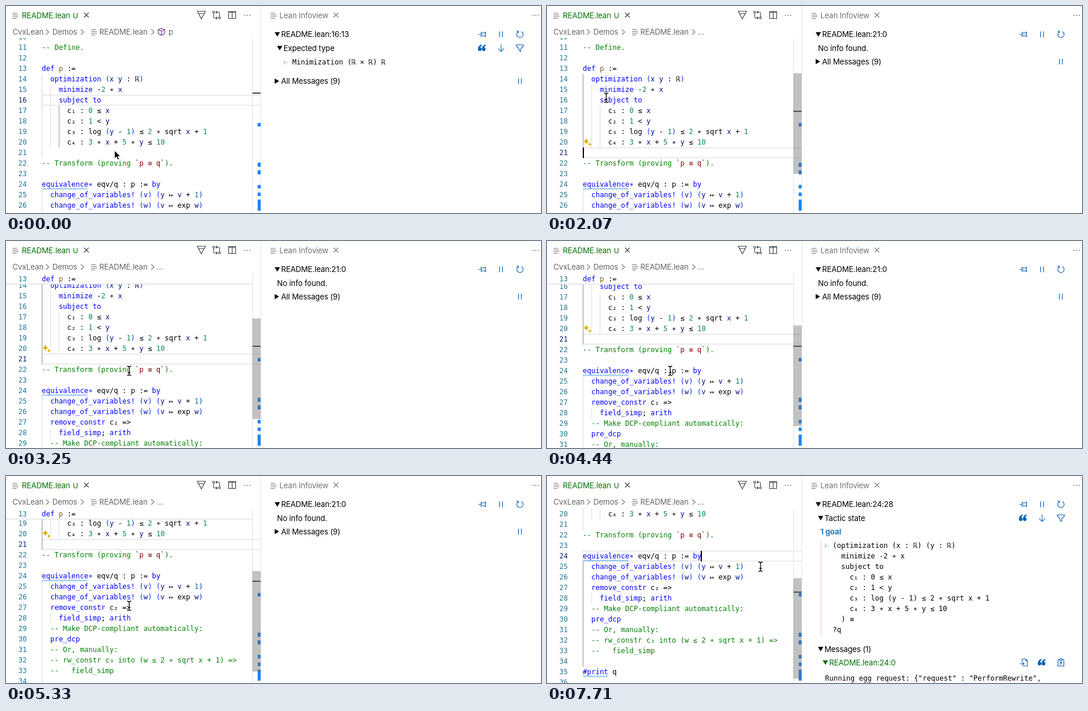
These frames come from a looping animation (912 px wide and 354 px high, 8 s). An HTML page:

```html
<!DOCTYPE html>
<html lang="en">
<head>
<meta charset="utf-8">
<title>Lean editor and infoview</title>
<style>
html, body { margin: 0; width: 100%; height: 100%; overflow: hidden; background: #fff; }
svg { display: block; width: 912px; height: 354px; }
text { white-space: pre; }
.mono { font: 12px "DejaVu Sans Mono", monospace; fill: #000; }
.ui { font: 13px Inter, sans-serif; letter-spacing: -.13px; fill: #000; }
.comment { fill: #008000; }
.keyword { fill: #0000ff; }
.name { fill: #795e26; }
.number { fill: #098658; }
.bracket { fill: #0431fa; }
.variable { fill: #001080; }
.quoted { fill: #800000; }
.lineno { fill: #237893; }
.lineno.active { fill: #0b216f; }
.guide { stroke: #d9d9d9; }
.guide.active { stroke: #939393; }
.icon { fill: none; stroke: #005fb8; stroke-width: 1.1; }
.solid { fill: #005fb8; }
.dark { stroke: #3b3b3b; }
.grey { stroke: #777; }
</style>
</head>
<body>
<svg id="stage" viewBox="0 0 912 354"></svg>
<script>
const LOOP = 8000, ROW = 18, CHAR = 7.224, LEFT = 61, FIRST = 10;

const CODE = `

-- Define.

def p :=
  optimization (x y : ℝ)
    minimize -2 * x
    subject to
      c₁ : 0 ≤ x
      c₂ : 1 < y
      c₃ : log (y - 1) ≤ 2 * sqrt x + 1
      c₄ : 3 * x + 5 * y ≤ 10

-- Transform (proving \`p ≡ q\`).

equivalence* eqv/q : p := by
  change_of_variables! (v) (y ↦ v + 1)
  change_of_variables! (w) (v ↦ exp w)
  remove_constr c₂ =>
    field_simp; arith
  -- Make DCP-compliant automatically:
  pre_dcp
  -- Or, manually:
  -- rw_constr c₃ into (w ≤ 2 * sqrt x + 1) =>
  --   field_simp

#print q
`.split('\n').slice(1);

// time, scroll, pointer x, pointer y
const STEPS = [
  [0, 0, 185, 247], [740, 0, 189, 252], [890, 0, 187, 250], [1040, 0, 180, 243],
  [1180, 0, 166, 229], [1330, 0, 148, 208], [1480, 0, 128, 185], [1630, 0, 112, 168],
  [1780, 0, 104, 160], [1920, 0, 101, 157], [2220, 0, 122, 170], [2360, 0, 172, 202],
  [2520, 0, 204, 219], [2660, 15, 210, 222], [2810, 32, 210, 222], [3110, 49, 210, 222],
  [3250, 49, 210, 222], [3550, 66, 210, 222], [3690, 66, 210, 222], [4140, 66, 210, 222],
  [4440, 83, 210, 222], [4590, 100, 210, 222], [4740, 100, 210, 222], [4890, 117, 210, 222],
  [5190, 117, 210, 222], [5330, 134, 210, 222], [5630, 151, 210, 222], [5930, 168, 210, 222],
  [6230, 168, 228, 208], [6380, 168, 270, 172], [6530, 168, 306, 146], [6670, 168, 318, 139],
  [6820, 168, 322, 139], [6970, 168, 338, 144], [7120, 168, 356, 152], [7260, 168, 364, 155],
  [7710, 168, 364, 155]
];

const CLASSES = ['comment', 'keyword', 'name', 'number', 'bracket', 'variable'];
const TOKENS = /(--.*)|(def|optimization|minimize|subject to|equivalence\*|change_of_variables!|remove_constr|field_simp|arith|pre_dcp|#print|\bby\b)|((?<=def )p)|(\b\d+\b)|([()])|(\b[xyvw]\b)/g;

const glyphs = s => s.replace(/</g, '&lt;').replace(/\*/g, '∗');
const span = (cls, s) => `<tspan class="${cls}">${s}</tspan>`;
const highlight = s => glyphs(s.replace(/</g, '‹').replace(TOKENS, (m, ...groups) => {
  const cls = CLASSES[groups.findIndex(Boolean)];
  return `\u0001${cls}\u0002${m.replace(/`.*`/, q => `\u0003\u0001quoted\u0002${q}\u0003\u0001comment\u0002`)}\u0003`;
})).replace(/‹/g, '&lt;')
  .replace(/\u0001(\w+)\u0002([^\u0003]*)\u0003/g, (_, cls, s) => span(cls, s));

const ui = (x, y, s, attrs = '') => `<text class="ui" x="${x}" y="${y}" ${attrs}>${s}</text>`;
const mono = (x, y, s, cls = '') => `<text class="mono ${cls}" x="${x}" y="${y}">${s}</text>`;
const rect = (x, y, w, h, fill, attrs = '') =>
  `<rect x="${x}" y="${y}" width="${w}" height="${h}" fill="${fill}" ${attrs}/>`;
const icon = (x, y, d, cls = '') => `<path class="icon ${cls}" transform="translate(${x} ${y})" d="${d}"/>`;
const group = (id, body, attrs = '') => `<g id="${id}" ${attrs}>${body}</g>`;
const rowTop = n => 62 + (n - 11) * ROW;

const ICON = {
  lines: 'M-5-3.5H3M-5-.5H5M-5 2.5H5M-5 5.5H2',
  close: 'M-4-4L4 4M4-4L-4 4',
  chevron: 'M-2.5-4.5L2.5 0L-2.5 4.5',
  dots: 'M-5.5 0h2M-1 0h2M3.5 0h2',
  forall: 'M-7-6.5H7L0 6.5ZM-4.5-2.5H4.5',
  compare: 'M-5-6.5a1.6 1.6 0 1 1-.1 0M-5-3V3.5Q-5 5-3 5H1M-1 2.8L1.3 5L-1 7.2M5 3.3a1.6 1.6 0 1 1-.1 0M5 3V-3.5Q5-5 3-5H-1M1-7.2L-1.3-5L1-2.8',
  split: 'M-6-6H6V6H-6ZM0-6V6M-6-4.5H6',
  cube: 'M0-6L5.5-3.5V3L0 6L-5.5 3V-3.5ZM-5.5-3.5L0-1L5.5-3.5M0-1V6',
  pin: 'M-6.5 0H-2M-2-4.5V4.5M-2-2.5H3.5L5.5-4V4L3.5 2.5H-2',
  pause: 'M-2.5-5V5M2.5-5V5',
  refresh: 'M-3-4.4A5.4 5.4 0 1 0 2.5-4.8M-6-5.5H-2.5V-2',
  down: 'M0-6V5.5M-5 .8L0 5.8L5 .8',
  filter: 'M-6-5.5H6V-3.8L1.5 1V5.5L-1.5 4V1L-6-3.8Z',
  quote: 'M-1-5.5Q-6-3-6 2A2.6 2.6 0 1 0-3-.8Q-3.3-3-.6-4.6ZM5.8-5.5Q.8-3 .8 2A2.6 2.6 0 1 0 3.8-.8Q3.5-3 6.2-4.6Z',
  goto: 'M-3-1V-6H3L6-3V6H-2M3-6V-3H6M-7 2H0M-2.5-.7L.2 2L-2.5 4.7',
  paste: 'M-2-5H-5V6H5V-5H2M-2-6.5H2V-3.5H-2ZM0 4V-1M-2.3 1.2L0-1.2L2.3 1.2'
};

const tri = (x, y, open = true, fill = '#000') =>
  `<path fill="${fill}" d="${open ? `M${x} ${y - 3.7}h9l-4.5 7.6z` : `M${x} ${y - 4.5}v9l7.5-4.5z`}"/>`;
const quoteIcon = (x, y) => icon(x, y, ICON.quote, 'solid');
const pause = y => icon(876, y, ICON.pause, 'pausing');
const panelHead = place => tri(458, 48.5) + ui(469, 53, 'README.lean:' + place) +
  icon(812, 48.5, ICON.pin) + icon(844, 48.5, ICON.pause) + icon(876, 48.5, ICON.refresh);
const goalTools = quoteIcon(811, 72) + icon(844, 72, ICON.down) + icon(876, 72, ICON.filter);
const allMessages = y => tri(458, y, false) + ui(469, y + 4.5, 'All Messages (9)') + pause(y);
const turnstile = y => mono(473, y, '⊢', '" fill-opacity=".55" style="fill:#2a6f9f');

const GOAL = `(optimization (x : ℝ) (y : ℝ)
  minimize -2 * x
  subject to
    c₁ : 0 ≤ x
    c₂ : 1 < y
    c₃ : log (y - 1) ≤ 2 * sqrt x + 1
    c₄ : 3 * x + 5 * y ≤ 10
  ) ≡
?q`.split('\n');

function wave(x, y, width) {
  let d = `M${x} ${y}`;
  for (let i = 1; i * 2.5 <= width; i++) d += `L${x + i * 2.5} ${y + (i % 2 ? 2.2 : 0)}`;
  return `<path d="${d}" fill="none" stroke="#1a85ff"/>`;
}

const guide = (level, from, to, owner) => {
  const x = LEFT + level * 2 * CHAR + .5;
  return `<path class="guide" data-owner="${owner}" d="M${x} ${rowTop(from)}V${rowTop(to + 1)}"/>`;
};

function codeLine(s, i) {
  const n = FIRST + i, y = rowTop(n) + 13, indent = s.search(/\S/);
  return mono(21, y, n, `lineno" data-line="${n}`) +
    (indent < 0 ? '' : mono(LEFT + indent * CHAR, y, highlight(s.trim())));
}

const header =
  icon(16, 16, ICON.lines, 'grey') + ui(27, 20.5, 'README.lean', 'style="fill:#007100"') +
  ui(114, 20.5, 'U', 'style="fill:#007100;font-size:12px"') + icon(137, 15.5, ICON.close, 'dark') +
  icon(333, 15.5, ICON.forall, 'dark') + icon(359, 15.5, ICON.compare, 'dark') +
  icon(385.5, 15.5, ICON.split, 'dark') + icon(411, 16, ICON.dots, 'dark" stroke-width="2') +
  icon(456, 16, ICON.lines, 'grey') + ui(466, 20.5, 'Lean Infoview', 'style="fill:#717171"') +
  icon(562.5, 15.5, ICON.close, 'grey') + icon(903, 16, ICON.dots, 'dark');

const crumb = (x, s) => ui(x, 49, s, 'style="fill:#666"');
const crumbs =
  crumb(11, 'CvxLean') + crumb(79, 'Demos') + crumb(159, 'README.lean') +
  [70.5, 130, 250].map(x => icon(x, 44.5, ICON.chevron, 'grey')).join('') +
  icon(150, 44, ICON.lines, 'grey') +
  group('crumbName', `<g style="--c:#652d90">${icon(265, 44, ICON.cube, '" style="stroke:#652d90')}</g>` + crumb(277, 'p')) +
  group('crumbMore', crumb(257, '...'));

const sparkle = group('sparkle',
  '<path fill="#ddb100" d="M67 226q1 4.500 5 5.500q-4 1-5 5.500q-1-4.500-5-5.500q4-1 5-5.500zM73 233.500q.6 2.600 3.200 3.200q-2.600.6-3.200 3.200q-.6-2.600-3.200-3.200q2.600-.6 3.200-3.200z"/>');

const editor = group('scroller',
  `<rect id="current" x="61.5" width="380" height="17" fill="none" stroke="#e4e4e4" stroke-width="1.5"/>` +
  guide(0, 14, 21, 21) + guide(1, 15, 20, 0) + guide(2, 17, 20, 16) +
  guide(0, 25, 34, 24) + guide(1, 28, 28, 0) +
  CODE.map(codeLine).join('') +
  wave(LEFT, rowTop(24) + 15.5, 11 * CHAR) + wave(LEFT, rowTop(35) + 15.5, 6 * CHAR) +
  sparkle + '<rect id="caret" width="2" height="18"/>');

const sticky = group('sticky',
  rect(0, 55, 420, 18, '#fff') + rect(0, 73, 420, 1.2, '#ddd') +
  mono(21, 68.500, 13, 'lineno') + mono(LEFT, 68.500, highlight('def p :=')));

const ruler = rect(420, 56, 1, 298, '#e2e2e2') +
  [[200, 6], [268, 7], [281, 7], [306, 6], [319, 6], [331, 19]]
    .map(([y, h]) => rect(429, y, 5, h, '#1a85ff')).join('') +
  rect(420, 0, 14, 2, '#424242', 'id="position"') +
  rect(420, 115, 14, 172, '#646464', 'id="slider" fill-opacity=".4"');

const panels =
  group('panel0', panelHead('16:13') + tri(462, 72) + ui(473, 76.5, 'Expected type') + goalTools +
    turnstile(100) + mono(488, 100, 'Minimization (ℝ × ℝ) ℝ') + allMessages(128.5)) +
  group('panel1', panelHead('21:0') + ui(462, 76.5, 'No info found.') + allMessages(95)) +
  group('panel2', panelHead('24:28') + tri(462, 72) + ui(473, 76.5, 'Tactic state') + goalTools +
    ui(466, 99.5, '1 goal', 'style="fill:#2a78b8;font-weight:700"') +
    rect(466.5, 110, 1, 162, '#ffbcbc') + turnstile(123) +
    GOAL.map((s, i) => mono(487 + s.search(/\S/) * CHAR, 123 + i * ROW, glyphs(s.trim()))).join('')) +
  group('messages', tri(462, 296) + ui(473, 300.5, 'Messages (1)') +
    tri(470, 319, true, '#007100') + ui(481, 323.5, 'README.lean:24:0', 'style="fill:#007100"') +
    icon(813, 319, ICON.goto) + quoteIcon(843, 319) + icon(876, 319, ICON.paste) +
    mono(474, 350, 'Running egg request: {"request" : "PerformRewrite",'));

const pointers =
  group('arrow', '<path d="M0 0V14L3.300 11L5.500 16L8 15L5.800 10.200H10Z" stroke="#fff"/>') +
  group('beam', ['#fff" stroke-width="3', '#000" stroke-width="1.3'].map(stroke =>
    `<path fill="none" stroke="${stroke}" d="M-3.500-8Q0-8 0-5.500Q0-8 3.500-8M0-6V6M-3.500 8Q0 8 0 5.500Q0 8 3.500 8M-2 3H2"/>`).join(''));

document.getElementById('stage').innerHTML =
  '<clipPath id="view"><rect y="55" width="434" height="299"/></clipPath>' +
  rect(0, 0, 912, 354, '#fff') +
  `<g clip-path="url(#view)">${editor}${sticky}${ruler}</g>` +
  rect(434, 0, 1, 354, '#e5e5e5') + header + crumbs + panels + pointers;

const $ = id => document.getElementById(id);
const set = (id, attrs) => Object.entries(attrs).forEach(([k, v]) => $(id).setAttribute(k, v));
const show = (id, on) => { $(id).style.display = on ? '' : 'none'; };
const move = (id, x, y) => set(id, { transform: `translate(${x} ${y})` });
const blinkOn = ms => ms % 1000 < 500;

function render(time) {
  const [t, scroll, x, y] = STEPS.findLast(step => step[0] <= time);
  const line = t < 740 ? 16 : t < 6670 ? 21 : 24;

  move('scroller', 0, -scroll);
  set('current', { y: rowTop(line) + .5 });
  set('caret', { x: line === 24 ? 262 : LEFT, y: rowTop(line) });
  show('caret', line === 21 ? blinkOn(t - 620) : line === 24 && blinkOn(t - 6610));
  show('sparkle', t >= 1920 && line === 21);
  show('sticky', scroll > 42 && scroll < 160);
  document.querySelectorAll('[data-line]').forEach(e => e.classList.toggle('active', +e.dataset.line === line));
  document.querySelectorAll('[data-owner]').forEach(e => e.classList.toggle('active', +e.dataset.owner === line));

  set('position', { y: 148 + 6.2 * (line - 16) });
  set('slider', { y: 115 + .355 * scroll });
  show('slider', t >= 740);

  show('crumbName', t < 1040);
  show('crumbMore', t >= 1040);
  show('panel0', t < 1040);
  show('panel1', t >= 1040 && t < 6970);
  show('panel2', t >= 6970);
  show('messages', t >= 7120);

  show('arrow', t < 740);
  show('beam', t >= 740);
  move(t < 740 ? 'arrow' : 'beam', x, y);
}

const start = performance.now();
function tick() {
  render((performance.now() - start) % LOOP);
  requestAnimationFrame(tick);
}
tick();
</script>
</body>
</html>
```
